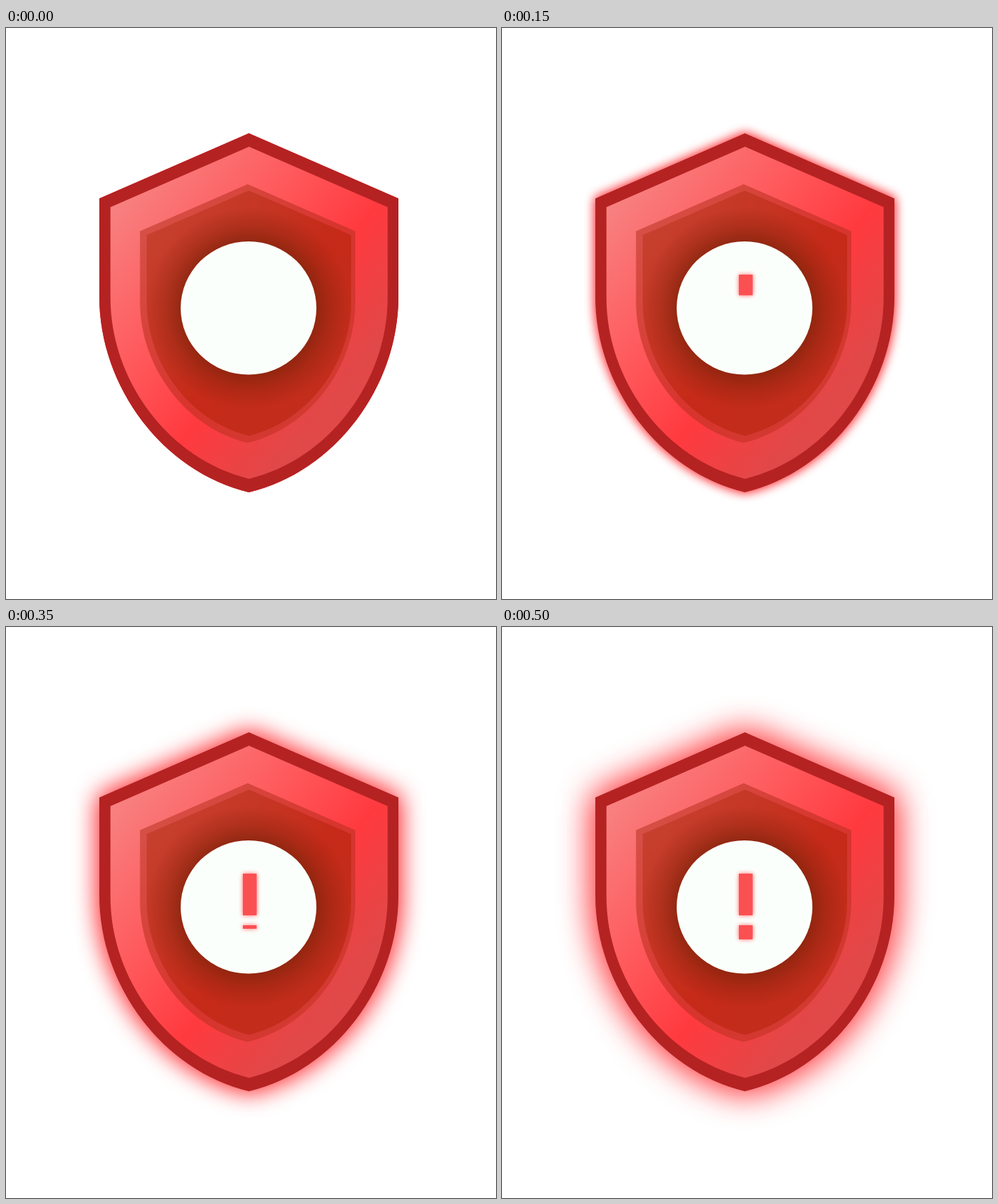
An HTML page without scripts for the animation above (800 ms loop, 693 by 808 pixels).

```html
<!DOCTYPE html>
<html lang="en">
<head>
<meta charset="utf-8">
<title>Shield alert</title>
<style>
  html, body { margin: 0; width: 100%; height: 100%; overflow: hidden; background: #fff; }
  svg { display: block; width: 693px; height: 808px; }

  .glow { fill: #ff3035; animation: spread 800ms infinite; }
  .glow.boost { opacity: .5; }
  .mark { fill: #fb5052; filter: drop-shadow(0 0 3px rgba(255, 48, 53, .75)); }
  .mark rect { transform-box: fill-box; transform-origin: top; }
  .bar { animation: bar 800ms infinite; }
  .dot { animation: dot 800ms infinite; }

  @keyframes spread {
    0% { filter: blur(0px); animation-timing-function: steps(10, end); }
    62.5%, 100% { filter: blur(24.5px); }
  }
  @keyframes bar {
    0% { transform: scaleY(0); animation-timing-function: steps(6, end); }
    37.5%, 100% { transform: scaleY(1); }
  }
  @keyframes dot {
    0% { transform: scaleY(0); }
    37.5% { transform: scaleY(0); animation-timing-function: steps(4, end); }
    62.5%, 100% { transform: scaleY(1); }
  }
</style>
</head>
<body>
<svg viewBox="0 0 693 808">
  <defs>
    <path id="shield" d="M9 0 0 4v6c0 5.55 3.84 10.74 9 12 5.16-1.26 9-6.45 9-12V4z"/>
    <use id="outer" href="#shield" transform="translate(132 149) scale(23.5 23.09)"/>
    <linearGradient id="body" x2="1" y2="1">
      <stop offset=".1" stop-color="#f88080"/>
      <stop offset=".38" stop-color="#ff575a"/>
      <stop offset=".57" stop-color="#ff3a3f"/>
      <stop offset=".78" stop-color="#e14848"/>
    </linearGradient>
    <linearGradient id="rim" x2="1" y2="1">
      <stop offset=".1" stop-color="#d64f45"/>
      <stop offset=".55" stop-color="#d7342d"/>
      <stop offset=".85" stop-color="#d23a31"/>
    </linearGradient>
    <linearGradient id="core" x2="1" y2="1">
      <stop offset=".1" stop-color="#c6402e"/>
      <stop offset=".55" stop-color="#c62a18"/>
      <stop offset=".85" stop-color="#c22d1c"/>
    </linearGradient>
    <radialGradient id="shade" gradientUnits="userSpaceOnUse" cx="9" cy="10.54" r="9"
      gradientTransform="translate(9 10.54) scale(1 1.005) translate(-9 -10.54)">
      <stop offset=".64" stop-color="#80240c" stop-opacity=".78"/>
      <stop offset=".8" stop-color="#80240c" stop-opacity=".36"/>
      <stop offset="1" stop-color="#80240c" stop-opacity="0"/>
    </radialGradient>
  </defs>

  <g class="glow"><use href="#outer"/></g>
  <g class="glow boost"><use href="#outer"/></g>

  <use href="#outer" fill="#b52222"/>
  <use href="#shield" transform="translate(147.7 168) scale(21.78 21.36)" fill="url(#body)"/>
  <use href="#shield" transform="translate(189.5 221) scale(16.92 16.64)" fill="url(#rim)"/>
  <g transform="translate(199 230) scale(16.06 15.77)">
    <use href="#shield" fill="url(#core)"/>
    <use href="#shield" fill="url(#shade)"/>
  </g>
  <ellipse cx="343" cy="396.3" rx="96" ry="94.3" fill="#fbfffb"/>

  <g class="mark">
    <rect class="bar" x="335" y="349" width="19.5" height="59"/>
    <rect class="dot" x="335" y="422" width="19.5" height="20"/>
  </g>
</svg>
</body>
</html>
```
